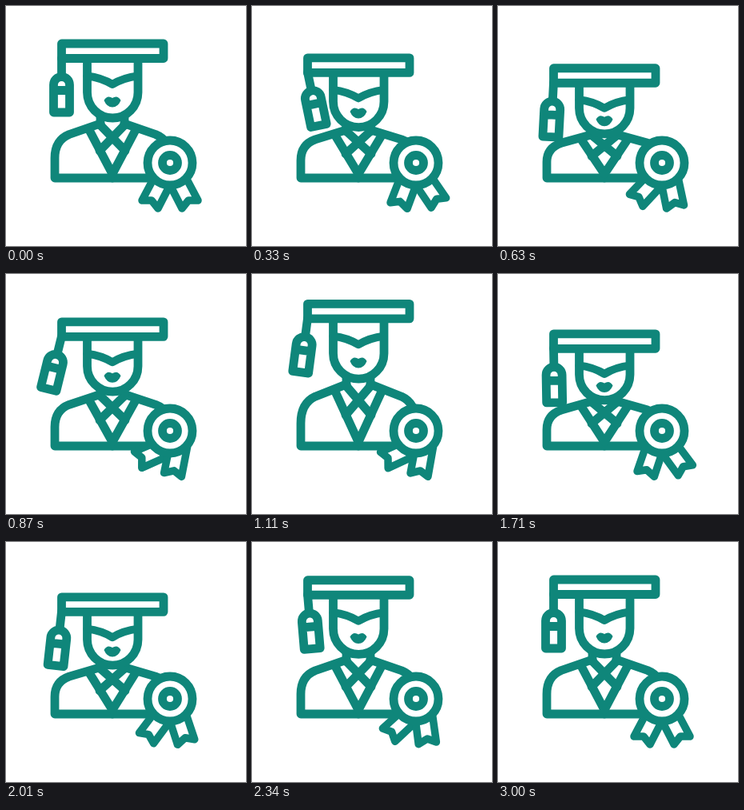
An HTML page with a canvas that plays this animation: 300x300 px, repeating every 4.53 s.

```html
<!DOCTYPE html>
<html lang="en">
<head>
<meta charset="utf-8">
<title>Graduate</title>
<style>
  html, body { margin: 0; width: 100%; height: 100%; overflow: hidden; background: #fff; }
  canvas { display: block; width: 300px; height: 300px; }
</style>
</head>
<body>
<canvas id="stage"></canvas>
<script>
const LOOP = 4530, STEP = 30;
const TEAL = '#0f867a', WEIGHT = 10.8;
const canvas = document.getElementById('stage');
const ctx = canvas.getContext('2d');
const ratio = window.devicePixelRatio || 1;
canvas.width = canvas.height = 300 * ratio;

// Keys are [time, value] pairs, joined by sine easing.
function tween(keys, t) {
  for (let i = 1; i < keys.length; i++) {
    const [t0, a] = keys[i - 1], [t1, b] = keys[i];
    if (t < t1) return a + (b - a) * (1 - Math.cos(Math.PI * (t - t0) / (t1 - t0))) / 2;
  }
  return keys[keys.length - 1][1];
}

// Two dips with a small lift between them.
const bob = (down, up, t) =>
  tween([[0, 0], [600, down], [1200, -up], [1800, down * 0.97], [2400, 0]], t);

const TASSEL = [[0, 0], [300, -12], [900, 14], [1500, -10], [1920, 8], [2300, -5], [2640, 0]];
const RIBBON = [[0, 0], [300, -7], [1000, 43], [1560, -12], [2300, 20], [3000, 0]];

function line(d, fill) {
  const path = new Path2D(d);
  if (fill) {
    ctx.fillStyle = fill;
    ctx.fill(path);
  }
  ctx.stroke(path);
}

function swing(x, y, degrees, draw) {
  ctx.save();
  ctx.translate(x, y);
  ctx.rotate(degrees * Math.PI / 180);
  ctx.translate(-x, -y);
  draw();
  ctx.restore();
}

function drawBody(t) {
  const lift = bob(13, 10, t);
  // The hem stays put; everything above it stretches.
  const y = v => v + lift * (215 - v) / 65;
  line(`M133 215 H61 V${y(190)} C61 ${y(174)} 68 ${y(165)} 79 ${y(160.5)} L118 ${y(147)}`);
  line(`M133 215 H205 V${y(190)} C205 ${y(174)} 198 ${y(165)} 187 ${y(160.5)} L148 ${y(147)}`);
  line(`M103.5 ${y(154)} L133 210 L162.5 ${y(154)}`);
  line(`M118 ${y(149)} L149 ${y(181)} M148 ${y(149)} L117 ${y(181)}`);
  const chin = 135 + bob(20, 10, t);
  if (chin < y(149)) line(`M118 ${chin} V${y(149)} M148 ${chin} V${y(149)}`);
}

function drawHead(t, cap) {
  const jaw = 108 + bob(20, 10.5, t);
  const brow = bob(30, 12, t);
  line(`M101.5 ${65 + cap} V${jaw} A31.75 32 0 0 0 165 ${jaw} V${65 + cap}`, '#fff');

  ctx.lineWidth = 10;
  line(`M101.5 ${87.5 + brow} Q119 ${89.5 + brow} 133 ${98 + brow} Q147 ${89.5 + brow} 165 ${87.5 + brow}`);
  ctx.lineWidth = WEIGHT;

  ctx.save();
  ctx.translate(133, 114 + bob(24, 11, t));
  ctx.fillStyle = TEAL;
  ctx.fill(new Path2D('M-10.5 4 Q-8 -.5 -4.5 -.5 Q-2 -.5 0 1 Q2 -.5 4.5 -.5 Q8 -.5 10.5 4 Q7 12.5 0 12.5 Q-7 12.5 -10.5 4 Z'));
  ctx.restore();
}

function drawCap(t, cap) {
  ctx.save();
  ctx.translate(0, cap);
  swing(69.5, 65, tween(TASSEL, t), () => {
    line('M69.5 65 V88');
    line('M59.5 133 V98.5 A10 10 0 0 1 79.5 98.5 V133 Z M59.5 105.5 H79.5', '#fff');
  });
  line('M69.5 47 H197 V65.5 H69.5 Z', '#fff');
  ctx.restore();
}

function drawBadge(t) {
  const turn = tween(RIBBON, t);
  ctx.lineWidth = 9.5;
  // Each tail hangs from its own point under the rosette.
  swing(195, 219, turn, () => line('M188 209 L170 243 L182 243 L190 253 L210 214', '#fff'));
  swing(215, 219, turn, () => line('M222 209 L240 243 L228 243 L220 253 L200 214', '#fff'));
  ctx.lineWidth = WEIGHT;
  line('M177 196 a28 28 0 1 0 56 0 a28 28 0 1 0 -56 0 Z', '#fff');
  line('M195.5 196 a9.5 9.5 0 1 0 19 0 a9.5 9.5 0 1 0 -19 0 Z');
}

function draw(now) {
  const t = Math.floor((now % LOOP) / STEP) * STEP;
  const cap = bob(31, 12, t);
  ctx.setTransform(ratio, 0, 0, ratio, 0, 0);
  ctx.fillStyle = '#fff';
  ctx.fillRect(0, 0, 300, 300);
  ctx.strokeStyle = TEAL;
  ctx.lineWidth = WEIGHT;
  ctx.lineCap = ctx.lineJoin = 'round';
  drawBody(t);
  drawHead(t, cap);
  drawCap(t, cap);
  drawBadge(t);
}

function tick() {
  draw(performance.now());
  requestAnimationFrame(tick);
}
tick();
</script>
</body>
</html>
```
